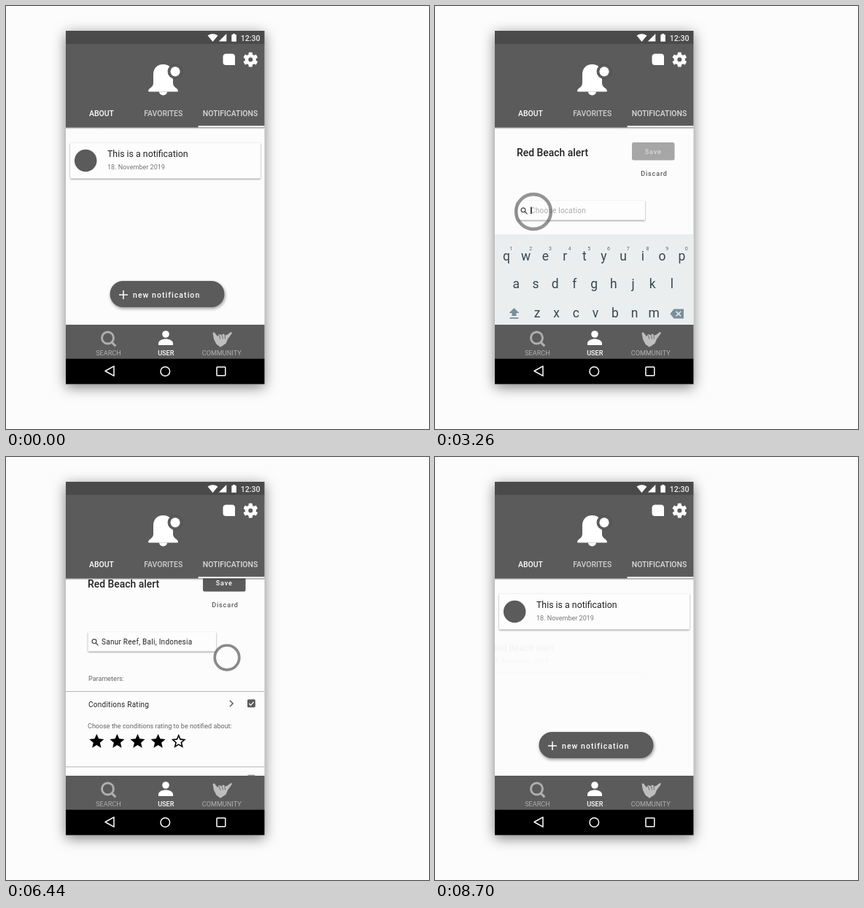
An HTML page that plays this animation: 580x580 px, repeating every 9 s.

```html
<!DOCTYPE html>
<html lang="en">
<head>
<meta charset="utf-8">
<title>Notification flow</title>
<style>
  html, body { margin: 0; width: 100%; height: 100%; overflow: hidden; background: #fcfcfc; }
  svg { display: block; width: 580px; height: 580px; font-family: Roboto, sans-serif; }
  .phone { filter: drop-shadow(0 4px 9px rgba(0,0,0,.5)); }
  .lift { filter: drop-shadow(.7px 1px 1.2px rgba(0,0,0,.42)); }
  .mid { text-anchor: middle; }
  .med { font-weight: 500; }
  .tab { font-size: 10.45px; font-weight: 500; text-anchor: middle; }
  .nav { font-size: 9.15px; text-anchor: middle; fill: #aeaeae; }
  .name { font-size: 13.9px; font-weight: 500; }
  .row { font-size: 10px; letter-spacing: .26px; fill: #222; }
  .hint { font-size: 9.05px; fill: #666; }
  .btn { font-size: 9px; font-weight: 500; letter-spacing: .85px; text-anchor: middle; }
  .key { font-size: 17.5px; fill: #37474f; text-anchor: middle; }
  .num { font-size: 7px; fill: #546e7a; text-anchor: middle; }
  .line { stroke: #b4b4b4; stroke-width: 1; }
  .open { fill: none; stroke: #5b5b5b; stroke-width: 1.5; }
</style>
</head>
<body>
<svg viewBox="0 0 580 580">
  <defs>
    <clipPath id="view"><rect x="82" y="166" width="272.5" height="271.5"/></clipPath>
    <linearGradient id="edge" x2="0" y2="1">
      <stop stop-color="#000" stop-opacity=".38"/><stop offset="1" stop-color="#000" stop-opacity="0"/>
    </linearGradient>
  </defs>
  <rect width="580" height="580" fill="#fcfcfc"/>
  <rect class="phone" x="82" y="34" width="272.5" height="484.5" fill="#fcfcfc"/>

  <g clip-path="url(#view)">
    <g id="home">
      <g id="cards"></g>
      <rect x="142.500" y="377" width="157" height="36" rx="18" fill="#5b5b5b" style="filter:drop-shadow(1px 2px 2px rgba(0,0,0,.4))"/>
      <path d="M155 396h12M161 390v12" stroke="#fff" stroke-width="1.5"/>
      <text class="med" x="174" y="399.700" font-size="10.5" letter-spacing="1.05" fill="#fff">new notification</text>
    </g>

    <g id="form">
      <text id="name" class="name" x="112" y="205.500"></text>
      <rect id="nameCaret" y="195" width="1.5" height="11" fill="#333"/>
      <rect id="save" x="270" y="187" width="58.500" height="24.500" rx="2.500"/>
      <text id="saveText" class="btn" x="299.200" y="202.800">Save</text>
      <text class="btn" x="300.500" y="233.300" fill="#5b5b5b">Discard</text>
      <rect class="lift" x="112.500" y="267" width="175.500" height="26.500" fill="#fdfdfd"/>
      <g fill="none" stroke="#444" stroke-width="1.200"><circle cx="121" cy="279.800" r="2.900"/><path d="M123.200 282l3.300 3.300"/></g>
      <text id="place" class="row" x="131" y="284"></text>
      <rect id="placeCaret" y="275.500" width="1.700" height="9.500" fill="#333"/>
      <text class="hint" x="113" y="334.300">Parameters:</text>
      <path class="line" d="M82 348.500h272.500"/>
      <g id="rating"></g>
      <g id="panel">
        <text class="hint" x="112" y="398.600">Choose the conditions rating to be notified about:</text>
        <g id="stars"></g>
      </g>
      <g id="lower"></g>
    </g>

    <g id="keys"><rect x="82" y="313" width="272.500" height="125" fill="#ebeeef"/></g>
    <circle id="touch" fill="none" stroke="#5b5b5b"/>
    <rect x="82" y="166" width="272.500" height="3" fill="url(#edge)"/>
  </g>

  <rect x="82" y="34" width="272.500" height="18.500" fill="#4a4a4a"/>
  <rect x="82" y="52" width="272.500" height="114.500" fill="#5b5b5b"/>
  <rect x="263.500" y="164.300" width="91" height="2" fill="#fff"/>
  <g fill="#fff">
    <path d="M276.500 40.500q7-4.500 14 0l-7 8.500z"/>
    <path d="M302.300 38v10.500h-10.500z"/>
    <path d="M309.300 39.300h1.800v-1.300h3v1.300h1.800v9.400h-6.600z"/>
    <text class="med" x="321.700" y="47.500" font-size="10.600" fill="#eee">12:30</text>
    <path d="M302 65.500h8a4 4 0 0 1 4 4v11.500h-12.500a4 4 0 0 1-4-4v-7.500a4 4 0 0 1 4.500-4z"/>
    <g id="gear"><circle cx="335.300" cy="73.500" r="7.600"/></g>
    <circle cx="335.300" cy="73.500" r="3" fill="#5b5b5b"/>
    <path d="M215.500 80c-8.500 0-13.500 6-13.500 14v12c0 3-2 5-5.500 7.500q-3 4 0 4h38q3 0 0-4c-3.500-2.500-5.500-4.500-5.500-7.500v-12c0-8-5-14-13.500-14z"/>
    <path d="M210 117.500h11a5.500 5 0 0 1-11 0z"/>
    <circle cx="232" cy="89.800" r="10" fill="#5b5b5b" stroke="#4c4c4c" stroke-width=".8"/>
    <circle cx="232" cy="89.800" r="6.600"/>
    <text class="tab" x="131" y="151.400">ABOUT</text>
    <text class="tab" x="215.800" y="151.400" fill="#cfcfcf">FAVORITES</text>
    <text class="tab" x="307.500" y="151.400" fill="#dadada">NOTIFICATIONS</text>
  </g>

  <rect x="82" y="437" width="272.500" height="47" fill="#5b5b5b"/>
  <path d="M145.300 461.300l5 5" stroke="#aeaeae" stroke-width="3.200"/>
  <circle cx="139.500" cy="455" r="8" fill="none" stroke="#aeaeae" stroke-width="2.900"/>
  <circle cx="219" cy="450" r="4.800" fill="#fff"/>
  <path d="M209 465v-2.500c0-4 6-6 10-6s10 2 10 6v2.500z" fill="#fff"/>
  <path d="M283.500 448.500q1.500-2 3 0l3.500 4.500 2-3 3.200 1 3-1.500 2.500 2 2.300-.5 5-3.800q2.200-.5 1.500 2l-5.500 7.500-2.500 6-7.500 5-5.500-4-3.500-7z" fill="#bebebe"/>
  <path d="M292 451l2 6M296 450.500l1.500 6M300 451l.5 5.500" stroke="#5b5b5b" stroke-width=".8"/>
  <text class="nav" x="140.500" y="479.200">SEARCH</text>
  <text class="nav med" x="219.300" y="479.200" style="fill:#fff">USER</text>
  <text class="nav" x="295.700" y="479.200">COMMUNITY</text>
  <rect x="82" y="483.700" width="272.500" height="34.800" fill="#000"/>
  <g fill="none" stroke="#fff" stroke-width="1.500">
    <path d="M136 500.500l12-6.700v13.400z" stroke-linejoin="round"/>
    <circle cx="218.300" cy="501" r="6.300"/>
    <rect x="289" y="495" width="11.800" height="11.800" rx=".8"/>
  </g>
</svg>
<script>
const LOOP = 9000, PAGE = 300, OPEN = 68;
const $ = id => document.getElementById(id);
const add = (id, html) => $(id).insertAdjacentHTML('beforeend', html);
const set = (id, attrs) => { for (const k in attrs) $(id).setAttribute(k, attrs[k]); };
const move = (id, x, y) => set(id, { transform: `translate(${x} ${y})` });
const show = (id, on) => set(id, { opacity: +on });

const span = (t, a, b) => Math.min(1, Math.max(0, (t - a) / (b - a)));
const smooth = p => p * p * (3 - 2 * p);
const glide = p => 1 - (1 - p) ** 4;

// Static parts
const card = (id, y, title) => `<g id="${id}">
  <rect class="lift" x="88" y="${y}" width="261" height="49" fill="#fdfdfd"/>
  <circle cx="109.200" cy="${y + 24.5}" r="15.300" fill="#5b5b5b"/>
  <text x="139" y="${y + 19.7}" font-size="12.350" fill="#222">${title}</text>
  <text x="139" y="${y + 36.6}" font-size="9.050" fill="#777">18. November 2019</text></g>`;
add('cards', card('first', 187.5, 'This is a notification') + card('second', 246.5, 'Red Beach alert'));

const row = (y, label, id) => `<text class="row" x="113" y="${y + 4.6}">${label}</text>
  <path id="${id}Arrow" class="open" d="M304.700 ${y - 2.2}l4.300 4.300 4.300-4.300"/>
  <rect x="331.600" y="${y - 5}" width="9.600" height="9.600" rx="1" fill="none" stroke="#7c7c7c"/>`;
add('rating', row(365, 'Conditions Rating', 'rating') + `<g id="check">
  <rect x="331" y="359.500" width="10.700" height="10.700" rx="1.300" fill="#5b5b5b"/>
  <path d="M333.300 365l2.200 2.300 4.200-4.500" fill="none" stroke="#fff" stroke-width="1.300"/></g>`);
add('lower', '<path class="line" d="M82 383.800h272.500M82 417.500h272.500"/>'
  + row(400.2, 'Tide', 'tide') + row(433.5, 'Swell', 'swell'));

const starEdge = 'M12 17.270L18.180 21l-1.640-7.030L22 9.240l-7.190-.61L12 2 9.190 8.630 2 9.240l5.460 4.730L5.820 21z';
const starHole = 'M12 15.400l-3.760 2.270 1-4.280-3.320-2.880 4.380-.38L12 6.100l1.710 4.040 4.380.38-3.320 2.880 1 4.280z';
for (let i = 0; i < 5; i++) {
  add('stars', `<g transform="translate(${112.3 + 28.1 * i} 404.700)"><path d="${starEdge}"/>
    <path class="${i < 4 ? 'hole' : ''}" d="${starHole}" fill="#fcfcfc"/></g>`);
}
const holes = document.querySelectorAll('.hole');

['qwertyuiop', 'asdfghjkl', 'zxcvbnm'].forEach((line, r) => {
  [...line].forEach((c, i) => {
    const x = [98, 111.3, 140][r] + 26.7 * i;
    add('keys', `<text class="key" x="${x}" y="${[348.5, 387, 426.7][r]}">${c}</text>`);
    if (!r) add('keys', `<text class="num" x="${x + 6.5}" y="334.500">${(i + 1) % 10}</text>`);
  });
});
add('keys', `<path d="M108.500 414l-7 7h4v4h6v-4h4zM102.500 427h12v1.700h-12z" fill="#78909c"/>
  <path d="M322.500 422l5-6.500h13.500v13h-13.500z" fill="#78909c"/>
  <path d="M330.500 418.700l6.600 6.600m0-6.600l-6.600 6.600" stroke="#ebeeef" stroke-width="1.500"/>`);

for (let i = 0; i < 6; i++) {
  add('gear', `<rect x="332.700" y="63.500" width="5.200" height="6" rx="1" transform="rotate(${i * 60} 335.300 73.500)"/>`);
}

// Motion
const taps = [
  // start, end, x, y
  [1380, 1720, 118, 201],
  [2960, 3300, 135, 282],
  [4660, 4820, 336, 267],
  [5060, 5300, 309.5, 268],
  [5460, 5800, 208, 316]
];
const drags = [[4180, 4500], [6340, 6660]];

function drawTouch(t, scroll) {
  const tap = taps.find(([a, b]) => t >= a && t < b);
  const drag = drags.find(([a, b]) => t >= a && t < b);
  show('touch', 0);
  if (tap) {
    const p = span(t, tap[0], tap[1]);
    const outer = 12 + 16 * p, inner = Math.max(0, 56 * (p - .5));
    const alpha = p < .4 ? .1 + 2 * p : .9 - .95 * Math.max(0, p - .62);
    set('touch', { cx: tap[2], cy: tap[3], r: (outer + inner) / 2,
      'stroke-width': Math.max(0, outer - inner), opacity: alpha });
  } else if (drag) {
    const p = span(t, drag[0], drag[1]);
    set('touch', { cx: 303, cy: 302 + scroll, r: 16.8, 'stroke-width': 3.7,
      opacity: .7 * Math.min(1, p * 6, (1 - p) * 3) });
  }
}

function type(id, t, [from, to, caretOn, caretOff], text, hint, ink) {
  const el = $(id), n = Math.ceil(text.length * span(t, from, to));
  const value = n ? text.slice(0, n) : hint;
  if (el.textContent !== value) el.textContent = value;
  set(id, { style: `fill:${n ? ink : '#a9a9a9'}` });
  const caret = id + 'Caret', on = t >= caretOn && t < caretOff;
  show(caret, on);
  if (on) set(caret, { x: +el.getAttribute('x') + (n ? el.getComputedTextLength() + .5 : 0) });
}

function draw(t) {
  const enter = smooth(span(t, 300, 1080)), leave = smooth(span(t, 7240, 8080));
  const late = t > 4000;
  const scroll = -98 * glide(span(t, 4180, 4500)) + 91 * glide(span(t, 6340, 6660));
  move('home', PAGE * (late ? 1 - leave : -enter), 0);
  move('form', PAGE * (late ? -leave : 1 - enter), scroll);

  const exit = span(t, 8640, 8700);
  move('second', -62 * exit, 0);
  show('second', 0);
  if (late) set('second', { opacity: 1 - .96 * exit });

  type('name', t, [1980, 2700, 1780, 2700], 'Red Beach alert', 'Notification Name', '#222');
  type('place', t, [3320, 3860, 3120, 3900], 'Sanur Reef, Bali, Indonesia', 'Choose location', '#222');

  const ready = t > 4500;
  set('save', { fill: ready ? '#5b5b5b' : '#a6a6a6' });
  set('saveText', { fill: ready ? '#fff' : '#d8d8d8' });

  const keys = smooth(span(t, 1600, 1780)) - smooth(span(t, 4120, 4280));
  move('keys', 0, 126 * (1 - keys));

  set('check', { opacity: span(t, 4720, 4780) });
  const open = smooth(span(t, 5120, 5300));
  set('panel', { opacity: open });
  move('lower', 0, OPEN * open);
  set('ratingArrow', { transform: `rotate(${-90 * open} 309 365)` });
  holes.forEach(h => h.setAttribute('opacity', 1 - span(t, 5580, 5680)));

  drawTouch(t, scroll);
}

const start = performance.now();
(function tick() {
  draw((performance.now() - start) % LOOP);
  requestAnimationFrame(tick);
})();
</script>
</body>
</html>
```
